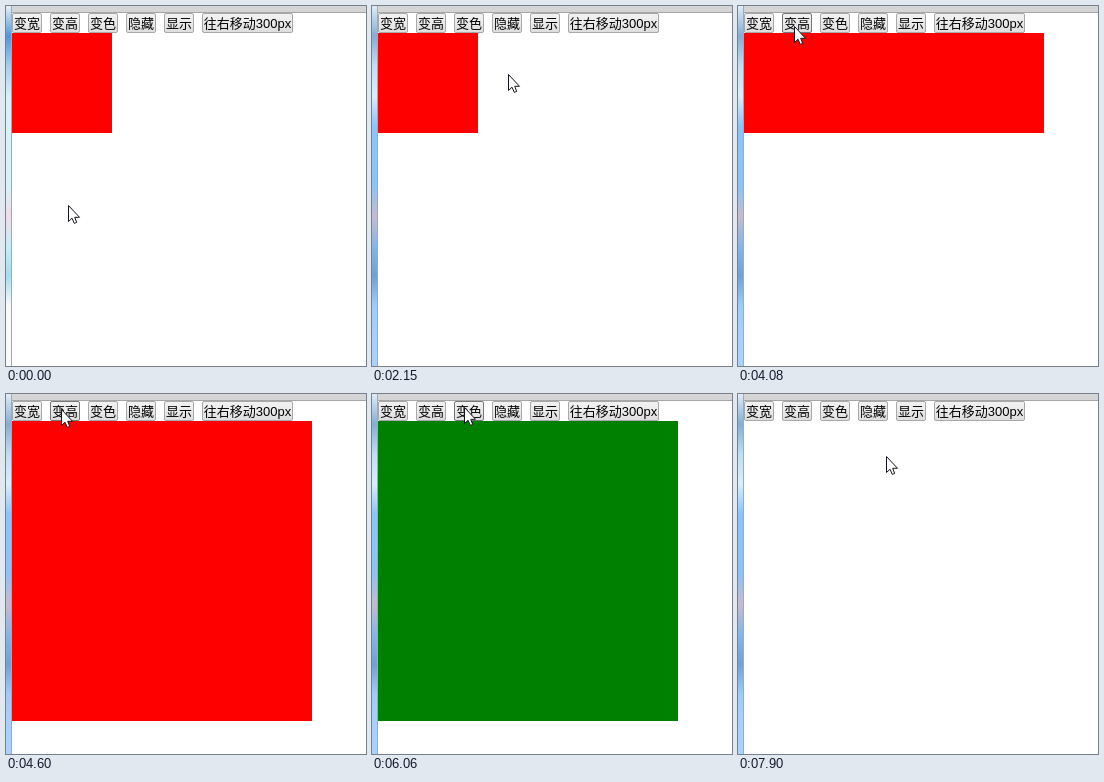
Write an HTML page with a canvas that moves like this. It is 360 px wide and 360 px high and loops after 8000 ms.

```html
<!DOCTYPE html>
<html lang="zh-CN">
<head>
<meta charset="utf-8">
<title>按钮演示</title>
<style>
html, body { margin: 0; width: 100%; height: 100%; overflow: hidden; background: #fff; }
canvas { display: block; width: 360px; height: 360px; }
</style>
</head>
<body>
<canvas id="stage" width="360" height="360"></canvas>
<script>
const ctx = document.getElementById('stage').getContext('2d');
const LOOP = 8000, STEP = 65, PRESS = 150;
const LEFT = 6, TOP = 7, BUTTON_H = 20, GAP = 8;
const FONT = '13px "Liberation Sans", "Noto Sans CJK SC", "Noto Sans CJK", sans-serif';

const labels = ['变宽', '变高', '变色', '隐藏', '显示', '往右移动300px'];
const clicks = { wide: 2980, tall: 4600, green: 6060, hide: 7650 };
const clickTimes = Object.values(clicks);

// Each move ends at x, y; swing bows the path sideways on the way
const home = { x: 62, y: 199 };
const moves = [
  { from: 200, to: 990, x: 46, y: 53, swing: [117, 0] },
  { from: 1050, to: 1410, x: 25, y: 15, swing: [-12, -4] },
  { from: 1610, to: 2450, x: 26, y: 15, swing: [122, 59] },
  { from: 3510, to: 3630, x: 59, y: 43 },
  { from: 3830, to: 4140, x: 55, y: 15 },
  { from: 4860, to: 5040, x: 88, y: 78 },
  { from: 5440, to: 5800, x: 92, y: 13 },
  { from: 6320, to: 6440, x: 100, y: 77 },
  { from: 6700, to: 7060, x: 137, y: 20 },
  { from: 7780, to: 7900, x: 148, y: 62 }
];

const arrow = new Path2D('M.5 .5V16.5L4 13.2L6.3 18.4L8.7 17.4L6.7 12.3H11.5Z');

// Desktop colours beside the window, evenly spaced from top to bottom
const paleDesk = ['#e6f0f6', '#4f96d8', '#a4d0ec', '#d4f2fa', '#d6f2fa', '#d8f2fa', '#d8f2fa',
  '#f0dce8', '#c6eef8', '#a8dcf0', '#f8fafa', '#fafafa', '#fafafa'];
const blueDesk = ['#e0ecf8', '#84aed2', '#c0def4', '#d8eefc', '#8cc4f8', '#8ec4f6', '#90c2f2',
  '#c4bcd2', '#88b6e4', '#72a0d0', '#a0ccf8', '#a8d0fc', '#acd2fc'];

function mouseAt(t) {
  let at = home;
  for (const { from, to, x, y, swing = [0, 0] } of moves) {
    if (t < from) break;
    const steps = Math.round((to - from) / STEP) + 1;
    const done = Math.floor((t - from) / (to - from) * (steps - 1) + .001) + 1;
    const u = Math.min(1, done / steps);
    const bow = Math.sin(Math.PI * u);
    at = {
      x: Math.round(at.x + (x - at.x) * u + swing[0] * bow),
      y: Math.round(at.y + (y - at.y) * u + swing[1] * bow)
    };
  }
  return at;
}

function rect(x, y, w, h, fill) {
  ctx.fillStyle = fill;
  ctx.fillRect(x, y, w, h);
}

function vertical(y, h, colors) {
  const g = ctx.createLinearGradient(0, y, 0, y + h);
  colors.forEach((c, i) => g.addColorStop(i / (colors.length - 1), c));
  return g;
}

function drawWindow(t) {
  rect(0, 0, 360, 360, '#fff');
  rect(0, 0, 5, 360, vertical(0, 360, paleDesk));
  ctx.globalAlpha = Math.max(0, Math.min(1, (t - 200) / 500));
  rect(0, 0, 5, 360, vertical(0, 360, blueDesk));
  ctx.globalAlpha = 1;
  rect(5, 0, 1, 360, '#a6a9ac');
  rect(LEFT, 0, 354, 6, '#d5d5d5');
  rect(LEFT, 6, 354, 1, '#a6a6a6');
}

function drawButton(label, x, w, down, mouse) {
  const hover = mouse.x >= x && mouse.x < x + w && mouse.y >= TOP && mouse.y < TOP + BUTTON_H;
  ctx.beginPath();
  ctx.roundRect(x + .5, TOP + .5, w - 1, BUTTON_H - 1, 1.5);
  ctx.fillStyle = vertical(TOP, BUTTON_H, down ? ['#d8d8d8', '#e4e4e4'] : ['#f2f2f2', '#ebebeb', '#dcdcdc']);
  ctx.fill();
  ctx.strokeStyle = hover ? '#777' : '#a8a8a8';
  ctx.stroke();
  ctx.fillStyle = '#000';
  ctx.fillText(label, x + w / 2, TOP + 15);
}

function drawButtons(t, mouse) {
  ctx.font = FONT;
  ctx.textAlign = 'center';
  let x = LEFT;
  labels.forEach((label, i) => {
    const w = Math.round(ctx.measureText(label).width) + 4;
    const down = t >= clickTimes[i] - PRESS && t < clickTimes[i];
    drawButton(label, x, w, down, mouse);
    x += w + GAP;
  });
}

function drawBox(t) {
  if (t >= clicks.hide) return;
  const w = t < clicks.wide ? 100 : 300;
  const h = t < clicks.tall ? 100 : 300;
  rect(LEFT, TOP + BUTTON_H, w, h, t < clicks.green ? '#f00' : '#008000');
}

function drawMouse({ x, y }) {
  ctx.save();
  ctx.translate(x, y);
  ctx.fillStyle = '#fff';
  ctx.fill(arrow);
  ctx.strokeStyle = '#15151f';
  ctx.stroke(arrow);
  ctx.restore();
}

function draw(t) {
  const mouse = mouseAt(t);
  drawWindow(t);
  drawButtons(t, mouse);
  drawBox(t);
  drawMouse(mouse);
}

function tick() {
  draw(performance.now() % LOOP);
  requestAnimationFrame(tick);
}
tick();
</script>
</body>
</html>
```
